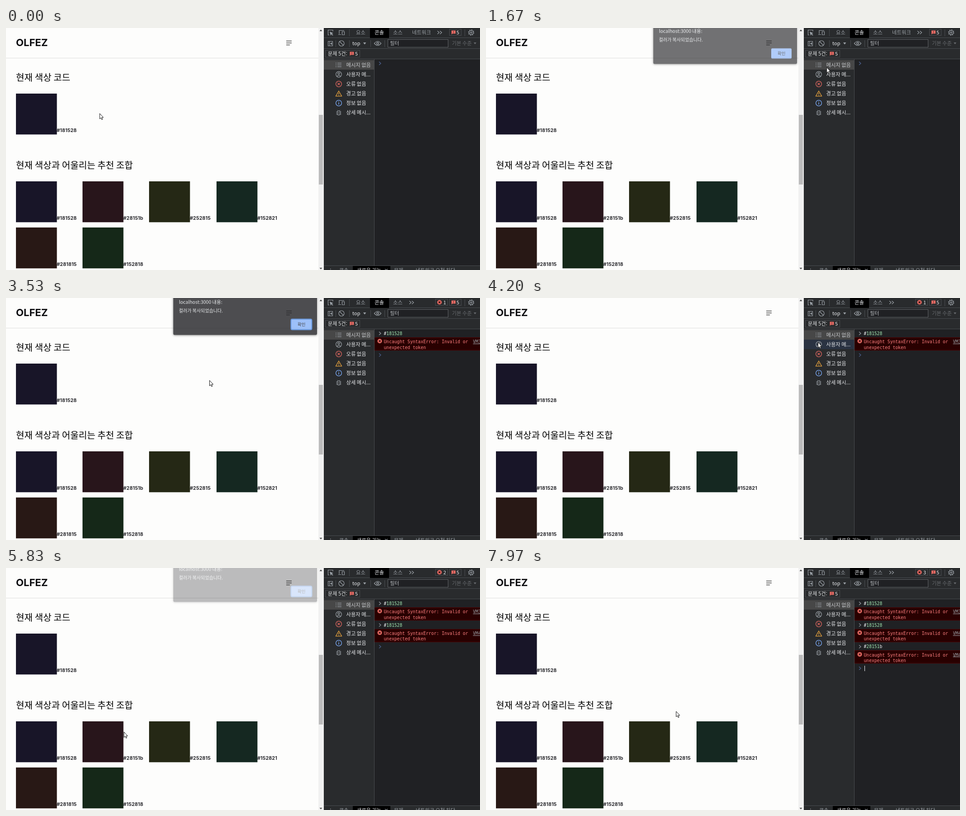
An HTML page with a canvas that plays this animation: 1047x535 px, repeating every 8 s.

```html
<!DOCTYPE html>
<html lang="ko">
<head>
<meta charset="utf-8">
<style>
  html, body { margin: 0; width: 100%; height: 100%; overflow: hidden; background: #fdfdfc; }
  canvas { display: block; }
</style>
</head>
<body>
<canvas id="stage" width="1047" height="535"></canvas>
<script>
const stage = document.getElementById('stage').getContext('2d');
let ctx = stage;
const LOOP = 8000;
const SANS = '"Noto Sans CJK KR", "Noto Sans CJK", "Noto Sans", sans-serif';
const MONO = '"DejaVu Sans Mono", monospace';
const INTER = 'Inter, sans-serif';
const LIGHT = '#e8eaed', GRAY = '#9aa0a6', LINE = '#494c50', BAR = '#292b2d', RED = '#e46962';

// Cursor way-points: time, x, y. Equal neighbours are rests.
const PATH = [
  [0, 207, 189], [350, 70, 195], [640, 70, 195], [1250, 650, 56], [1560, 650, 56],
  [1670, 752, 87], [1930, 880, 102], [2240, 880, 102], [2830, 283, 269], [3180, 66, 385],
  [3380, 66, 385], [3530, 448, 183], [3750, 652, 58], [4000, 652, 58], [4170, 712, 92],
  [4400, 880, 130], [4580, 880, 130], [4970, 407, 294], [5480, 224, 391], [5750, 224, 391],
  [6200, 652, 58], [6600, 652, 58], [6670, 725, 166], [6930, 912, 212], [7420, 912, 212],
  [7970, 420, 317], [8000, 420, 317]
];
const DIALOGS = [[480, 1603], [3365, 3960], [5770, 6635]];
const ENTRIES = [
  { code: '#181528', focus: 1960, paste: 2080, enter: 2300, blur: 3360, vm: 'VM371:1' },
  { code: '#181528', focus: 4420, paste: 4560, enter: 5060, blur: 5760, vm: 'VM402:1' },
  { code: '#28151b', focus: 6960, paste: 7120, enter: 7500, blur: 8000, vm: 'VM433:1' }
];
const SWATCHES = [
  [22, 145, '#181528'], [22, 339, '#181528'], [169, 339, '#28151b'], [316, 339, '#252815'],
  [465, 339, '#152821'], [22, 441, '#281815'], [169, 441, '#152818']
];
const FILTERS = ['메시지 없음', '사용자 메...', '오류 없음', '경고 없음', '정보 없음', '상세 메시...'];

const clamp = v => Math.max(0, Math.min(1, v));

function rect(x, y, w, h, color) {
  ctx.fillStyle = color;
  ctx.fillRect(x, y, w, h);
}
function box(x, y, w, h, color) {
  ctx.strokeStyle = color;
  ctx.lineWidth = 1;
  ctx.strokeRect(x + .5, y + .5, w - 1, h - 1);
}
function text(str, x, centerY, size, color, font = SANS, weight = 400) {
  ctx.font = `${weight} ${size}px ${font}`;
  ctx.fillStyle = color;
  ctx.fillText(str, x, centerY + size * .37);
}
function stroke(d, color, width = 1.2) {
  ctx.strokeStyle = color;
  ctx.lineWidth = width;
  ctx.stroke(new Path2D(d));
}
function fill(d, color) {
  ctx.fillStyle = color;
  ctx.fill(new Path2D(d));
}
function disc(x, y, r, color) {
  ctx.beginPath();
  ctx.arc(x, y, r, 0, 7);
  ctx.fillStyle = color;
  ctx.fill();
}
function ring(x, y, r, color, width = 1.2) {
  ctx.beginPath();
  ctx.arc(x, y, r, 0, 7);
  ctx.strokeStyle = color;
  ctx.lineWidth = width;
  ctx.stroke();
}
const cross = (x, y, r, color, width) =>
  stroke(`M${x - r} ${y - r}l${2 * r} ${2 * r}m0 ${-2 * r}l${-2 * r} ${2 * r}`, color, width);
const chevron = (x, y, color) => stroke(`M${x} ${y - 3.5}l4 3.5l-4 3.5`, color, 1.2);
function errorIcon(x, y) {
  disc(x, y, 5, RED);
  cross(x, y, 2, '#290a0a', 1.3);
}
function issueIcon(x, y) {
  fill(`M${x} ${y}h9v7h-7l-2 2z`, RED);
  rect(x + 4, y + 1.5, 1, 2.5, BAR);
  rect(x + 4, y + 5, 1, 1, BAR);
}

// Hermite interpolation that settles at rests.
function cursorAt(t) {
  let i = PATH.findIndex(p => p[0] > t) - 1;
  if (i < 0) i = PATH.length - 2;
  const slope = (k, axis) => {
    const a = PATH[k - 1], b = PATH[k], c = PATH[k + 1];
    if (!a || !c || (a[1] === b[1] && a[2] === b[2]) || (b[1] === c[1] && b[2] === c[2])) return 0;
    return (c[axis] - a[axis]) / (c[0] - a[0]);
  };
  const a = PATH[i], b = PATH[i + 1], dt = b[0] - a[0], u = clamp((t - a[0]) / dt);
  return [1, 2].map(axis =>
    a[axis] * (1 + 2 * u) * (1 - u) ** 2 + b[axis] * u * u * (3 - 2 * u) +
    dt * u * (1 - u) * (slope(i, axis) * (1 - u) - slope(i + 1, axis) * u));
}

function drawPage() {
  rect(0, 0, 690, 535, '#fdfdfc');
  rect(0, 66, 690, 1, '#dededd');
  text('OLFEZ', 22, 32, 22, '#0c0c10', INTER, 700);
  rect(619, 28, 12, 1.3, '#333');
  rect(619, 32.4, 12, 1.3, '#333');
  rect(619, 36.8, 8, 1.3, '#333');
  text('현재 색상 코드', 22, 109.5, 20.1, '#000', SANS, 500);
  text('현재 색상과 어울리는 추천 조합', 22, 304, 20.1, '#000', SANS, 500);
  for (const [x, y, color] of SWATCHES) {
    rect(x, y, 90.4, 90.4, color);
    text(color, x + 90, y + 81.2, 11, '#15151a', INTER, 600);
  }
  rect(690, 0, 12, 535, '#f1f1f1');
  rect(691, 192, 9, 154, '#bcbcbc');
  fill('M692.5 7h6l-3-3.5z', '#505050');
  fill('M692.5 530h6l-3 3.5z', '#505050');
}

function drawToolbars(errors) {
  rect(702, 0, 345, 535, BAR);
  rect(702, 21, 345, 1, LINE);
  rect(702, 45, 345, 1, LINE);
  rect(702, 68, 345, 1, LINE);

  stroke('M714 15.5h-2.5v-11h10.5v3', GRAY);
  fill('M715 8l8 3.2l-3.3 1.3l3 3l-1.2 1.2l-3 -3l-1.3 3.3z', GRAY);
  stroke('M736 13v-7.5h11M734 14.5h6M742.5 8h5v7h-5z', GRAY);
  rect(758, 3, 1, 15, LINE);
  rect(804, 0, 42, 22, '#000');
  text('요소', 773, 10, 11.3, GRAY);
  text('콘솔', 814, 10, 11.3, LIGHT);
  text('소스', 855, 10, 11.3, GRAY);
  if (!errors) text('네트워크', 897, 10, 11.3, GRAY);
  const moreX = errors ? 891 : 953;
  chevron(moreX, 10, GRAY);
  chevron(moreX + 5.5, 10, GRAY);
  if (errors) {
    box(948, 2, 28, 15, LINE);
    errorIcon(957.5, 9.5);
    text(errors, 966, 10, 11, LIGHT);
  }
  box(979, 2, 27, 15, LINE);
  issueIcon(984, 5.5);
  text('5', 995, 10, 11, LIGHT);
  rect(1013, 3, 1, 15, LINE);
  ring(1027.5, 10, 4.6, GRAY, 1.2);
  ctx.setLineDash([2.2, 2.4]);
  ring(1027.5, 10, 5.9, GRAY, 1.6);
  ctx.setLineDash([]);
  ring(1027.5, 10, 1.7, GRAY);

  box(711, 29, 11, 11, GRAY);
  rect(714, 29, 1, 11, GRAY);
  fill('M720 31.5v6l-4 -3z', GRAY);
  rect(728, 27, 1, 15, LINE);
  ring(741, 34, 6, GRAY);
  stroke('M737 30l8 8', GRAY);
  rect(758, 27, 1, 15, LINE);
  text('top', 765, 34, 11, LIGHT);
  fill('M789 32h6.5l-3.25 4.5z', GRAY);
  rect(805, 27, 1, 15, LINE);
  stroke('M813.5 34q7.5 -9 15 0q-7.5 9 -15 0z', GRAY);
  ring(821, 34, 2.2, GRAY, 1.4);
  rect(836, 27, 1, 15, LINE);
  rect(843, 25, 134, 18, '#202124');
  box(843, 25, 134, 18, '#606367');
  text('필터', 848, 34, 11.2, '#b4b7bb');
  text('기본 수준', 985, 34, 11.2, '#676a6e');
  fill('M1033 32h6l-3 4z', '#676a6e');

  box(705, 49, 77, 16, LINE);
  text('문제 5건:', 711, 57, 11.2, LIGHT);
  issueIcon(759.5, 52.5);
  text('5', 771, 57, 11, LIGHT);
}

function drawSidebar([cx, cy]) {
  const hovered = cx >= 702 && cx < 813 ? Math.floor((cy - 71) / 21.1) : -1;
  FILTERS.forEach((label, i) => {
    const y = 71 + i * 21.1;
    if (i === 0) rect(702, y, 111, 21, '#474747');
    else if (i === hovered) rect(702, y, 111, 21, '#2a3342');
    text(label, 751.5, y + 10.5, 11.3, i ? LIGHT : '#c9cbce');
  });
  for (let i = 0; i < 3; i++) {
    rect(728, 77 + i * 4, 2, 1.2, GRAY);
    rect(732, 77 + i * 4, 9, 1.2, GRAY);
  }
  ring(735, 102.5, 6.3, GRAY);
  ring(735, 100.6, 2, GRAY);
  stroke('M730.5 106.8q4.5 -3.8 9 0', GRAY);
  ring(735, 123.8, 6.4, RED, 1.3);
  cross(735, 123.8, 2.6, RED, 1.3);
  stroke('M735 139.2l6.5 11.5h-13zM735 143.3v3.7M735 148v1.3', '#e8a33d', 1.3);
  ring(735, 166, 6.4, '#7cacf8', 1.3);
  stroke('M735 165v4.3M735 162.3v1.4', '#7cacf8', 1.4);
  stroke('M732 186q0 -3 3 -3t3 3v3.5q0 3 -3 3t-3 -3zM734 186.5h2M734 189h2', GRAY, 1.1);
  stroke('M729.5 185h2.5M729.5 188h2.5M729.5 191h2.5M738 185h2.5M738 188h2.5M738 191h2.5' +
    'M732 181.5l1.5 1.5M738 181.5l-1.5 1.5', GRAY, 1);
  rect(813, 69, 1, 457, LINE);
}

function drawCode(code, x, y) {
  for (const part of code.match(/\d+|\D+/g)) {
    text(part, x, y, 9.66, /\d/.test(part) ? '#a5ecb4' : '#eceef0', MONO);
    x += ctx.measureText(part).width;
  }
  return x;
}

function drawConsole(t) {
  rect(814, 69, 233, 457, '#202124');
  let y = 78.3;
  for (const { code, vm } of ENTRIES.filter(e => t >= e.enter)) {
    const top = Math.round(y + 8.5);
    chevron(824, y, GRAY);
    drawCode(code, 834.5, y);
    rect(814, top, 233, 29, '#290000');
    rect(814, top, 233, 1, '#4a0000');
    rect(814, top + 28, 233, 1, '#4a0000');
    errorIcon(825.5, y + 17);
    text('Uncaught SyntaxError: Invalid or', 834.5, y + 18.2, 9.66, '#ff8080', MONO);
    text('unexpected token', 834.5, y + 30.7, 9.66, '#ff8080', MONO);
    text(vm, 1031.5, y + 18.2, 9.66, GRAY, MONO);
    rect(1031.5, top + 14, 16, 1, GRAY);
    y += 47.8;
  }
  const entry = ENTRIES.find(e => t >= e.focus && t < e.blur);
  chevron(824, y, '#4f6596');
  if (!entry) return;
  const typed = t >= entry.paste && t < entry.enter;
  const end = typed ? drawCode(entry.code, 836, y) : 836;
  const last = Math.max(...[entry.focus, entry.paste, entry.enter].filter(e => e <= t));
  if ((t - last) % 1000 < 500) rect(Math.round(end), Math.round(y) - 6, 1, 12, '#f2f3f5');
}

function drawDrawer() {
  rect(702, 525, 345, 10, BAR);
  rect(702, 525, 345, 1, LINE);
  rect(766, 526, 83, 9, '#000');
  rect(716, 532, 1.5, 1.5, GRAY);
  text('콘솔', 736, 535.5, 11.2, GRAY);
  text('새로운 기능', 775, 535.5, 11.2, LIGHT);
  cross(840, 535.5, 2.8, GRAY, 1.2);
  text('문제', 857, 535.5, 11.2, GRAY);
  text('네트워크 요청 차단', 905, 535.5, 11.2, GRAY);
}

// The dialog is painted opaque on its own layer, so that it fades as one piece.
const layer = document.createElement('canvas').getContext('2d');
layer.canvas.width = 700;
layer.canvas.height = 100;

function roundBox(x, y, w, h, r) {
  ctx.beginPath();
  ctx.roundRect(x, y, w, h, r);
}

function paintDialog(focused) {
  ctx.clearRect(0, 0, 700, 100);
  ctx.save();
  ctx.shadowColor = 'rgba(0,0,0,.5)';
  ctx.shadowBlur = 5;
  ctx.shadowOffsetY = 1;
  roundBox(369.5, -20, 317.5, 103.7, 3);
  ctx.fillStyle = '#292a2d';
  ctx.fill();
  ctx.restore();
  text('localhost:3000 내용:', 382, 10.8, 10.5, LIGHT);
  text('컬러가 복사되었습니다.', 382, 30.4, 10, LIGHT);
  roundBox(630, 49.2, 45, 22.5, 2.5);
  ctx.fillStyle = '#8ab4f8';
  ctx.fill();
  if (focused) {
    roundBox(629.5, 48.7, 46, 23.5, 3);
    ctx.strokeStyle = '#4d86dc';
    ctx.lineWidth = 2;
    ctx.stroke();
  }
  text('확인', 644, 60.2, 9.6, '#202124');
}

function drawDialog(t) {
  const span = DIALOGS.find(([open, close]) => t >= open && t < close + 200);
  if (!span) return;
  const closing = t >= span[1];
  const alpha = closing ? 1 - (t - span[1]) / 200 : clamp((t - span[0]) / 200);
  ctx = layer;
  paintDialog(!closing);
  ctx = stage;
  ctx.globalAlpha = alpha;
  ctx.drawImage(layer.canvas, 0, -12.5 * (1 - alpha));
  ctx.globalAlpha = 1;
}

function drawCursor([x, y]) {
  const arrow = new Path2D('M.5 .5v12l2.7 -2.5l1.8 4.2l1.9 -.8l-1.8 -4.1h3.5z');
  ctx.save();
  ctx.translate(x - .5, y - .5);
  ctx.fillStyle = '#fff';
  ctx.fill(arrow);
  ctx.strokeStyle = '#111';
  ctx.lineWidth = 1;
  ctx.stroke(arrow);
  ctx.restore();
}

function frame(now) {
  const t = now % LOOP;
  const cursor = cursorAt(t);
  drawPage();
  drawDialog(t);
  drawToolbars(ENTRIES.filter(e => t >= e.enter).length);
  drawSidebar(cursor);
  drawConsole(t);
  drawDrawer();
  drawCursor(cursor);
  requestAnimationFrame(frame);
}
requestAnimationFrame(frame);
</script>
</body>
</html>
```
